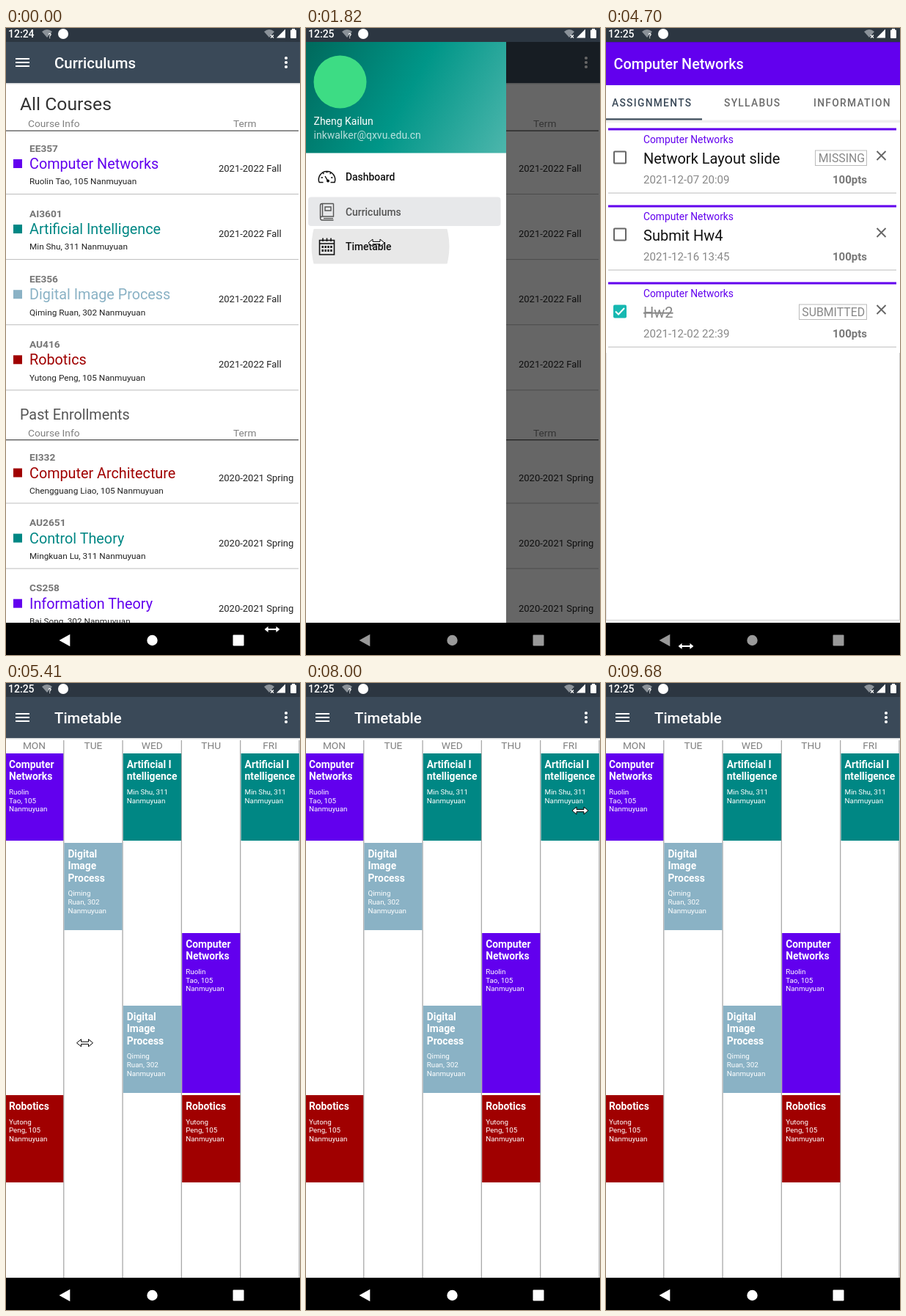
An HTML page that plays this animation: 401x855 px, repeating every 9.97 s.

```html
<!DOCTYPE html>
<html lang="en">
<head>
<meta charset="utf-8">
<title>Course planner</title>
<style>
  html, body { margin: 0; width: 100%; height: 100%; overflow: hidden; background: #fff; }
  svg { display: block; width: 401px; height: 855px; font-family: Roboto, "Noto Sans", sans-serif; }
</style>
</head>
<body>
<svg id="stage" viewBox="0 0 401 855"></svg>
<script>
const LOOP = 9970;
const SLATE = '#3a4958', VIOLET = '#6200ee', TEAL = '#008784', SKY = '#8ab2c5', RED = '#a00000';

// Markup helpers
const text = (x, y, s, size, fill, weight = 400, extra = '') =>
  `<text x="${x}" y="${y}" font-size="${size}" fill="${fill}" font-weight="${weight}" ${extra}>${s}</text>`;
const rect = (x, y, w, h, fill, extra = '') =>
  `<rect x="${x}" y="${y}" width="${w}" height="${h}" fill="${fill}" ${extra}/>`;
const circle = (x, y, r, fill, extra = '') => `<circle cx="${x}" cy="${y}" r="${r}" fill="${fill}" ${extra}/>`;
const path = (d, stroke, w, extra = '') =>
  `<path d="${d}" fill="none" stroke="${stroke}" stroke-width="${w}" ${extra}/>`;
const group = (id, body, extra = '') => `<g id="${id}" ${extra}>${body}</g>`;

// Pages reach a little past the stage so that a shrunken one still covers its edges
const wide = (y, h, fill, extra) => rect(-5, y, 408, h, fill, extra);
const page = (id, body) =>
  group(id, wide(10, 845, '#fff') + body + wide(811, 54, '#000'));

const toolbar = title =>
  rect(0, 75, 401, 1.5, '#d5d8da') + rect(0, 10, 401, 65, SLATE) +
  path('M13 42H32M13 47H32M13 52H32', '#fff', 2) +
  text(66, 55, title, 20.4, '#fff', 500) +
  [41, 47, 53].map(y => circle(382, y, 2.1, '#fff')).join('');

// Course list
const FALL = '2021-2022 Fall', SPRING = '2020-2021 Spring';
function courseRow([code, name, info, color], i, top, term) {
  const y = top + i * 89.1;
  return text(32, y + 28.5, code, 13.7, '#757575', 700) +
    rect(10, y + 39, 12, 12, color) +
    text(32, y + 52, name, 19.8, color) +
    text(32, y + 73.3, info, 11.8, '#222') +
    text(290, y + 56, term, 13, '#222') +
    rect(0, y + 86, 399, 1, '#bdbdbd');
}
function section(title, size, base, head, rows, term) {
  return text(19, base, title, size, size > 20 ? '#333' : '#555') +
    text(30, head, 'Course Info', 13.7, '#808080') +
    text(310, head, 'Term', 13.7, '#808080') +
    rect(0, head + 4.5, 399, 1.3, '#555') +
    rows.map((r, i) => courseRow(r, i, head + 5, term)).join('');
}
const listPage = page('list', toolbar('Curriculums') +
  section('All Courses', 24.7, 112, 135, [
    ['EE357', 'Computer Networks', 'Ruolin Tao, 105 Nanmuyuan', VIOLET],
    ['AI3601', 'Artificial Intelligence', 'Min Shu, 311 Nanmuyuan', TEAL],
    ['EE356', 'Digital Image Process', 'Qiming Ruan, 302 Nanmuyuan', SKY],
    ['AU416', 'Robotics', 'Yutong Peng, 105 Nanmuyuan', RED]], FALL) +
  section('Past Enrollments', 19.8, 533.5, 556.5, [
    ['EI332', 'Computer Architecture', 'Chengguang Liao, 105 Nanmuyuan', RED],
    ['AU2651', 'Control Theory', 'Mingkuan Lu, 311 Nanmuyuan', TEAL],
    ['CS258', 'Information Theory', 'Bai Song, 302 Nanmuyuan', VIOLET]], SPRING));

// Timetable
const SUBJECTS = {
  net: [VIOLET, ['Computer', 'Networks'], ['Ruolin', 'Tao, 105', 'Nanmuyuan']],
  ai: [TEAL, ['Artificial I', 'ntelligence'], ['Min Shu, 311', 'Nanmuyuan']],
  img: [SKY, ['Digital', 'Image', 'Process'], ['Qiming', 'Ruan, 302', 'Nanmuyuan']],
  rob: [RED, ['Robotics'], ['Yutong', 'Peng, 105', 'Nanmuyuan']]
};
function block(day, top, h, key) {
  const [color, names, info] = SUBJECTS[key], x = day * 80.4 - 1;
  const low = top + 23.4 + names.length * 16.3;
  return rect(x, top, 79.2, h, color) +
    names.map((s, i) => text(x + 5, top + 20 + i * 16.3, s, 13.8, '#fff', 700)).join('') +
    info.map((s, i) => text(x + 5, low + i * 11.7, s, 9.8, '#fff')).join('');
}
const timePage = page('time', toolbar('Timetable') +
  ['MON', 'TUE', 'WED', 'THU', 'FRI'].map((d, i) =>
    text(38.5 + i * 80.4, 90, d, 13.7, '#808080', 400, 'text-anchor="middle"') +
    rect(78.1 + i * 80.3, 78, 1.3, 733, '#aaa')).join('') +
  block(0, 96, 119, 'net') + block(2, 96, 119, 'ai') + block(4, 96, 119, 'ai') +
  block(1, 218, 119, 'img') + block(3, 341, 218, 'net') + block(2, 440, 119, 'img') +
  block(0, 562, 119, 'rob') + block(3, 562, 119, 'rob'));

// Course detail pages
function card(course, color, [name, date, tag], i) {
  const done = tag === 'SUBMITTED', w = done ? 92 : 70;
  const box = done
    ? rect(10, 167.5, 18, 18, '#16b8b1', 'rx="2"') + path('M13 176.5L17 180.5L25 172', '#fff', 2)
    : rect(11, 168.5, 16, 16, 'none', 'rx="1" stroke="#666" stroke-width="2"');
  const label = tag ? rect(355.5 - w, 167, w, 20.5, 'none', 'stroke="#bbb"') +
    text(353, 183, tag, 15.8, '#888', 400, 'text-anchor="end"') : '';
  return `<g transform="translate(0 ${i * 105})">` +
    rect(3, 136.5, 393, 3, color) +
    text(51, 156.7, course, 13.8, color) + box +
    text(51, 185, name, 20, done ? '#888' : '#111', 400, done ? 'text-decoration="line-through"' : '') +
    text(51, 212, date, 15.1, '#888') +
    text(356, 212, '100pts', 15, '#777', 700, 'text-anchor="end"') + label +
    path('M369.5 168L381.5 180M381.5 168L369.5 180', '#666', 1.9) +
    rect(3, 224.3, 393, 1.5, '#d2d2d2') + '</g>';
}
function coursePage(id, course, head, color, cards) {
  const tab = (x, s, c) => text(x, 107, s, 13.8, c, 500, 'letter-spacing="1.3"');
  const top = 128 + cards.length * 105;
  return page(id, wide(10, 68, head) + wide(10, 10, '#000', 'opacity=".15"') +
    text(10.5, 56, course, 19.8, '#fff', 500) +
    tab(8, 'ASSIGNMENTS', SLATE) + tab(161, 'SYLLABUS', '#6c6c6c') + tab(283, 'INFORMATION', '#6c6c6c') +
    rect(0, 125.5, 401, 3.5, '#efefef') + rect(0, 123.3, 131, 2.2, SLATE) +
    cards.map((c, i) => card(course, color, c, i)).join('') +
    path(`M0 ${top}V807.5H400.5V${top}`, '#d0d0d0', 1));
}
const coursePages =
  coursePage('net', 'Computer Networks', VIOLET, VIOLET, [
    ['Network Layout slide', '2021-12-07 20:09', 'MISSING'],
    ['Submit Hw4', '2021-12-16 13:45', ''],
    ['Hw2', '2021-12-02 22:39', 'SUBMITTED']]) +
  coursePage('img', 'Digital Image Process', SKY, TEAL, [
    ['Final Project', '2023-01-10 13:35', ''],
    ['Segment hw', '2021-12-15 23:00', 'SUBMITTED']]) +
  coursePage('ai', 'Artificial Intelligence', TEAL, TEAL, [
    ['Final Project', '2022-01-05 12:00', ''],
    ['Hw3', '2021-12-10 23:00', 'SUBMITTED']]);

// Navigation drawer
const days = [0, 1, 2, 3, 4, 5, 6, 7]
  .map(i => rect(21.5 + (i % 4) * 3.9, 297 + (i >> 2) * 5, 2.4, 3, '#111')).join('');
const gauge = path('M18 210.5A11.2 11.2 0 1 1 39 210.5H33.5M18 210.5H23.5M20.5 204H23M23 197.5L24.5 199M28.5 195V197.5M34 197.5L32.5 199M36.5 204H34M26 202L30 209', '#111', 1.5) +
  circle(30, 208.5, 2, '#111');
const book = path('M37.5 239.5H22Q19.5 239.5 19.5 242V259Q19.5 262 22 262H37.5M37.5 239.5V257H22Q19.5 257 19.5 259.5M22.5 239.5V257M26 244H34V249H26ZM24 259.6H37', '#555', 1.4);
const calendar = path('M18.5 289.5H38.5V309H18.5ZM18.5 294H38.5M23 286.5V291M28.5 286.5V291M34 286.5V291', '#111', 1.6) + days;
const drawer = group('drawer',
  rect(0, 19, 273, 792, '#fff') + rect(0, 19, 273, 151.5, 'url(#head)') +
  circle(46.5, 73.5, 36, '#3ddc84') +
  text(10.5, 132, 'Zheng Kailun', 14, '#fff') +
  text(10.5, 151, 'inkwalker@qxvu.edu.cn', 14, '#fff', 400, 'opacity=".72"') +
  rect(3, 230.5, 262.5, 39.5, '#e7e8ea', 'rx="4"') +
  `<g clip-path="url(#item)">${circle(101.5, 298, 0, '#e8e8e8', 'id="ripple"')}</g>` +
  gauge + book + calendar +
  text(54, 208, 'Dashboard', 13.9, '#111', 500) +
  text(54, 255.7, 'Curriculums', 13.9, '#555', 500) +
  text(54, 303.3, 'Timetable', 13.9, '#111', 500));

// System bars
const status = rect(0, 0, 401, 19, '#2c3641') +
  text(3, 13, '12:24', 14, '#fff', 500, 'id="clock"') +
  '<path d="M49 5Q56 -1 63 5L56 13Z" fill="#8b9299"/>' + text(57.5, 13.5, '?', 9, '#fff', 700) +
  circle(78, 8, 7, '#fff') +
  '<path d="M352 5Q359 -1 366 5L359 13Z" fill="#8b9299"/>' +
  path('M361 9.5L365 13.5M365 9.5L361 13.5', '#fff', 1.3) +
  '<path d="M369 13.5L381 1.5V13.5Z" fill="#fff"/>' +
  rect(388, 2.5, 8, 11.5, '#fff', 'rx="1"') + rect(390, 1, 4, 2, '#fff');
const nav = group('nav', '<path d="M72.5 835L87.3 826.8V843.2Z"/><circle cx="199.5" cy="835" r="7.2"/>' +
  '<rect x="309.5" y="827.5" width="15" height="15" rx="1"/>');
const cursor = group('cursor', '<path d="M-11 0L-5-5V-1.6H5V-5L11 0L5 5V1.6H-5V5Z" fill="#fff" stroke="#000"/>');

const stage = document.getElementById('stage');
stage.innerHTML = `<defs>
  <linearGradient id="head" gradientUnits="userSpaceOnUse" x1="0" y1="19" x2="273" y2="170">
    <stop offset="0" stop-color="#00695c"/><stop offset=".5" stop-color="#009688"/><stop offset="1" stop-color="#4db6ac"/>
  </linearGradient>
  <clipPath id="item"><rect x="3" y="274" width="262" height="47.5"/></clipPath></defs>` +
  listPage + timePage + coursePages +
  rect(0, 19, 401, 792, '#000', 'id="scrim"') + drawer + status + nav + cursor;
const el = id => document.getElementById(id);

// Motion
const clamp = v => Math.min(1, Math.max(0, v));
const span = (t, a, b) => clamp((t - a) / (b - a));
const smooth = v => v * v * (3 - 2 * v);
const easeOut = v => 1 - (1 - v) ** 3;
const settle = v => v <= 0 ? 0 : v >= 1 ? 1 : v < 1 / 6 ? 14.4 * v * v : 1 - 0.6 * Math.exp((1 / 6 - v) / 0.125);

const POINTER = [
  [0, 363, 820], [40, 363, 820], [880, 22, 47], [1050, 22, 47], [1560, 96, 293], [2090, 96, 293],
  [2720, 96, 528], [2880, 96, 528], [3050, 135, 380], [3240, 14, 157], [3880, 14, 157],
  [4500, 109, 843], [4860, 109, 843], [5680, 107, 372], [5880, 109, 300], [6540, 109, 300],
  [7160, 109, 843], [7410, 109, 843], [7960, 374, 174], [8500, 374, 174], [9150, 285, 843], [LOOP, 285, 843]
];
const VISITS = [['net', 3840, 4880], ['img', 6386, 7420], ['ai', 8430, 9280]];

function pointerAt(t) {
  const i = POINTER.findIndex(p => p[0] > t);
  const [a, x, y] = POINTER[i - 1], [b, u, v] = POINTER[i];
  const k = smooth(span(t, a, b));
  return [x + (u - x) * k, y + (v - y) * k];
}
function zoom(node, s) {
  node.setAttribute('transform', `translate(${200.5 * (1 - s)} ${427.5 * (1 - s)}) scale(${s})`);
}
function show(node, on) { node.style.display = on ? '' : 'none'; }

function draw(t) {
  show(el('list'), t < 2070);
  show(el('time'), t >= 2070);

  let back = 1;
  for (const [id, open, close] of VISITS) {
    const node = el(id), on = t >= open && t < close + 400;
    show(node, on);
    if (!on) continue;
    const p = settle((t - open) / 400), q = settle((t - close) / 400);
    zoom(node, 0.85 + 0.15 * p - 0.1 * q);
    node.style.opacity = span(t, open, open + 80) * (1 - span(t, close + 35, close + 120));
    back = 1 + 0.05 * (p - q);
  }
  zoom(el('time'), back);

  const out = easeOut(span(t, 950, 1270)) * (1 - smooth(span(t, 2090, 2420)));
  show(el('drawer'), out > 0);
  el('drawer').setAttribute('transform', `translate(${-273 * (1 - out)} 0)`);
  el('scrim').setAttribute('opacity', 0.6 * out);
  el('ripple').setAttribute('r', t < 1690 ? 0 : 30 + 63.5 * (t - 1690) / 130);

  el('clock').textContent = t < 1400 ? '12:24' : '12:25';
  const shade = Math.round(255 - 102 * (span(t, 950, 1200) - span(t, 4900, 5000)));
  el('nav').setAttribute('fill', `rgb(${shade},${shade},${shade})`);

  const [x, y] = pointerAt(t);
  const press = (t >= 3400 && t < 3480) || (t >= 6120 && t < 6200);
  show(el('cursor'), t < 9560);
  el('cursor').setAttribute('transform', `translate(${x} ${y}) scale(${press ? 0.9 : 1})`);
}

const start = performance.now();
function tick() {
  draw((performance.now() - start) % LOOP);
  requestAnimationFrame(tick);
}
draw(0);
requestAnimationFrame(tick);
</script>
</body>
</html>
```
